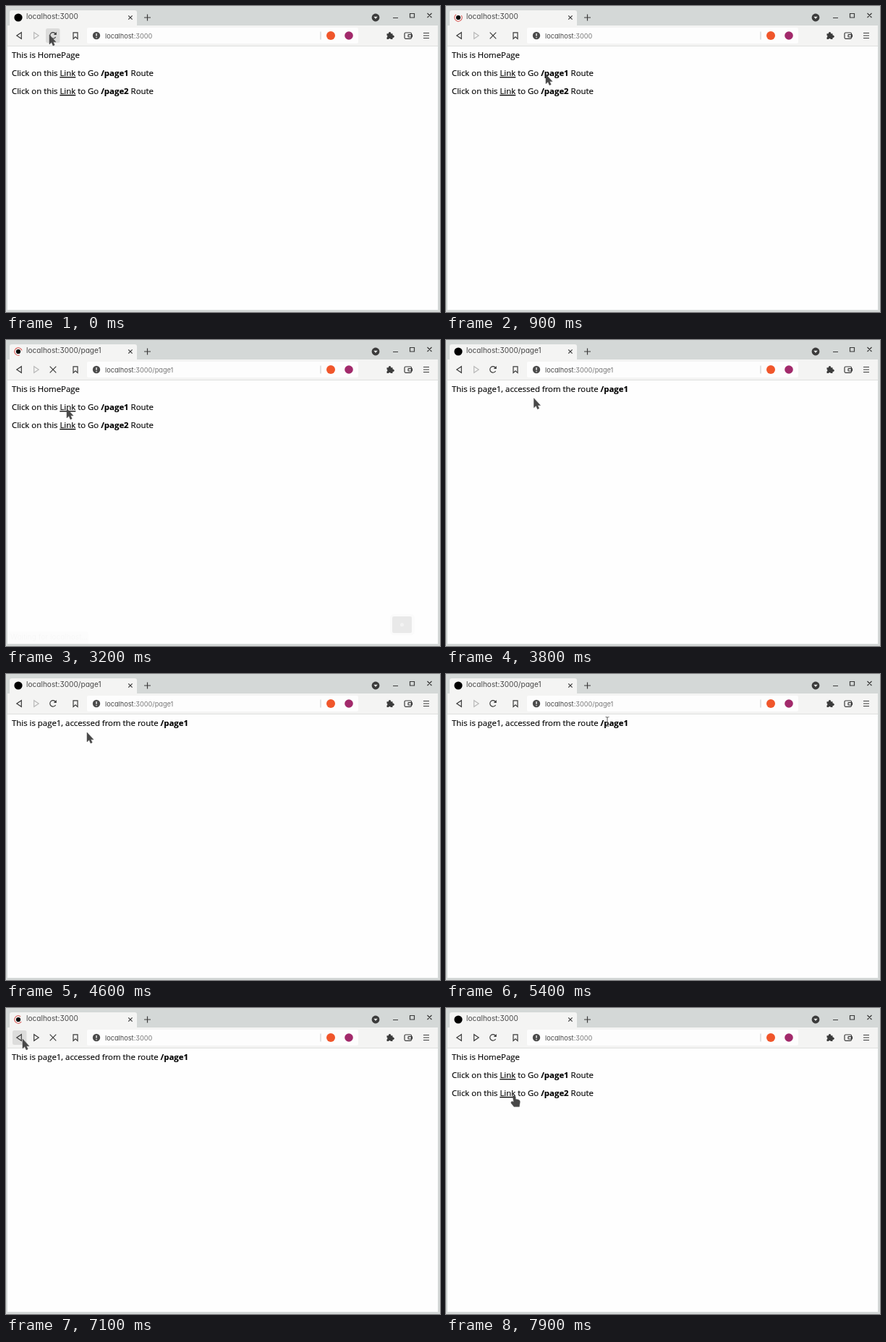
Write an HTML page that moves like this. It is 600 px wide and 424 px high and loops after 8000 ms.

```html
<!DOCTYPE html>
<html lang="en">
<head>
<meta charset="utf-8">
<title>Page routes</title>
<style>
  html, body { margin: 0; width: 100%; height: 100%; overflow: hidden; background: #d4d8d7; }
  svg { display: block; width: 100vw; height: 100vh; }
  .page { font: 11.4px "Open Sans", "Noto Sans", sans-serif; fill: #000; stroke: #000; stroke-width: .15; white-space: pre; }
  .page .b { font-weight: 700; }
  .page .u { text-decoration: underline; }
  .ui { font: 10.1px Inter, Lato, sans-serif; font-feature-settings: "cv11", "ss01"; fill: #484848; }
  .address { font-size: 9.2px; }
  .line { fill: none; stroke: #3b3b3b; stroke-width: 1.2; }
  .solid { fill: #3b3b3b; }
  .pointer { fill: #484848; stroke: #484848; stroke-width: .5; stroke-linejoin: round; }
</style>
</head>
<body>
<svg viewBox="0 0 600 424">
  <rect width="600" height="424" fill="#d4d8d7"/>
  <rect x="2" y="27" width="595" height="29" fill="#f4f4f3"/>
  <path d="M5 27V9q0-3 3-3H178q3 0 3 3V27Z" fill="#f4f4f3"/>
  <rect x="2" y="55" width="595" height="366" fill="#fefefe"/>
  <rect x="2" y="55" width="595" height="1" fill="#dedfde"/>

  <!-- tab -->
  <circle id="favicon" cx="17" cy="16" r="5.6"/>
  <circle id="spinner" cx="17" cy="16" r="5.2" fill="none" stroke="#d8504c" stroke-width="1" stroke-dasharray="24 9"/>
  <text id="title" class="ui" x="28" y="17.8"></text>
  <path class="line" d="M169.2 13.3l5.4 5.4m0-5.4l-5.4 5.4M191 16h9m-4.5-4.5v9" stroke-width="1.3"/>

  <!-- window buttons -->
  <circle class="solid" cx="511" cy="16" r="5.4"/>
  <path d="M508.3 14.7h5.4l-2.7 3.2z" fill="#e4e6e5"/>
  <path class="line" d="M535 16.5h7M558.5 10.5h6v5.5h-6zM582.5 10l6 6m0-6l-6 6"/>

  <!-- toolbar -->
  <rect id="hover" y="31" width="19.5" height="20" rx="2.5" fill="#dcdcdb"/>
  <path class="line" d="M14.8 41L21.3 36.7V45.3Z"/>
  <path id="forward" class="line" d="M45.2 41L38.7 36.7V45.3Z"/>
  <g id="reload">
    <path class="line" d="M68.6 43A4.2 4.2 0 1 1 68.3 38.3"/>
    <path class="solid" d="M69.8 36v4h-4z"/>
  </g>
  <path id="stop" class="line" d="M60.7 36.7l8.6 8.6m0-8.6l-8.6 8.6"/>
  <path class="line" d="M93 36.8h6v8.7l-3-2.6l-3 2.6z"/>
  <rect x="112" y="30" width="375" height="22" rx="2" fill="#fdfdfd"/>
  <circle cx="125" cy="41" r="5.2" fill="#4b4b4b"/>
  <path d="M125 38v3.8m0 1.1v1.3" stroke="#fff" stroke-width="1.3"/>
  <text class="ui address" x="137" y="44.5">localhost<tspan id="rest" fill="#777"></tspan></text>
  <path d="M435 35.5v11" stroke="#c9c9c9"/>
  <circle cx="449" cy="41" r="6" fill="#f0562b"/>
  <circle cx="474" cy="41" r="5.8" fill="#a22a6b"/>
  <g class="solid">
    <path d="M526.5 38.3h8v2.3a1.7 1.7 0 0 1 0 3.3v2.2h-2.7a1.5 1.5 0 0 0-2.9 0h-2.4v-2.6a1.5 1.5 0 0 0 0-2.8z"/>
    <circle cx="530.5" cy="37.8" r="1.7"/>
    <circle cx="535" cy="42.2" r="1.7"/>
  </g>
  <rect class="line" x="551" y="37" width="9.5" height="8.3" rx="1.5"/>
  <rect class="line" x="556" y="39.7" width="5.5" height="3.3" rx=".8"/>
  <path class="line" d="M577 37.5h8M577 41h8M577 44.5h8"/>

  <!-- page -->
  <g id="home" class="page">
    <text x="8" y="72.4">This is HomePage</text>
    <text x="8" y="97.2">Click on this <tspan class="u">Link</tspan> to Go <tspan class="b">/page1</tspan> Route</text>
    <text x="8" y="122">Click on this <tspan class="u">Link</tspan> to Go <tspan class="b">/page2</tspan> Route</text>
  </g>
  <text id="page1" class="page" x="8" y="72.4">This is page1, accessed from the route <tspan class="b">/page1</tspan></text>

  <g id="status">
    <path d="M2 404H111q3 0 3 3V421H2Z" fill="#d6d9d8"/>
    <text id="statusText" class="ui" x="6" y="415"></text>
  </g>
  <g id="building">
    <rect x="531" y="380" width="34" height="29" rx="5" fill="#fbfbfb"/>
    <rect x="534" y="383" width="27" height="23" rx="2" fill="#e9e9e9"/>
    <circle cx="547.5" cy="394.5" r="2.5" fill="#f3f3f3"/>
  </g>

  <!-- pointers, with their hot spot at 0,0 -->
  <path id="arrow" class="pointer" d="M0 0V13L3 10.3L5 15L7.2 14L5.2 9.8H9Z"/>
  <path id="hand" class="pointer" d="M-1.6 .5Q0-1.5 1.6 .5L2.5 4.5L6 5Q8.5 5.8 8.3 8L7.3 14.8H0L-4 9.8Q-4.4 7.3-2.3 7.5L-.4 8.2Z"/>
  <path id="beam" d="M-2.5-6.5Q0-6.5 0-5Q0-6.5 2.5-6.5M0-5V5M-2.5 6.5Q0 6.5 0 5Q0 6.5 2.5 6.5" fill="none" stroke="#777" stroke-width="1.2"/>
</svg>
<script>
const LOOP = 8000, STEP = 100;
const $ = id => document.getElementById(id);
const show = (id, on) => $(id).setAttribute("visibility", on ? "visible" : "hidden");
const within = (t, a, b) => t >= a && t < b;
const ramp = (t, a, b) => Math.min(1, Math.max(0, (t - a) / (b - a)));

// pointer stops: time, x, y
const path = [
  [0, 60, 40], [200, 60, 40], [400, 68, 46], [700, 188, 88], [1000, 113, 98],
  [1600, 84, 95], [3500, 84, 95], [3900, 134, 76], [4300, 51, 67],
  [4600, 112, 81], [4900, 168, 74], [5200, 213, 66], [5400, 223, 66],
  [5600, 245, 66], [5900, 130, 80], [6100, 80, 62], [6800, 23, 43],
  [7200, 23, 43], [7700, 90, 112], [7900, 94, 122], [8000, 94, 122]
];

function pointerAt(t) {
  const i = path.findIndex(p => p[0] > t);
  const [t0, x0, y0] = path[i - 1], [t1, x1, y1] = path[i];
  const k = (t - t0) / (t1 - t0);
  return [x0 + (x1 - x0) * k, y0 + (y1 - y0) * k];
}

function shapeAt(t) {
  if (within(t, 1800, 2700) || t >= 7800) return "hand";
  return within(t, 5100, 5700) ? "beam" : "arrow";
}

function draw(t) {
  const loading = within(t, 200, 1100) || within(t, 2700, 3400) || within(t, 7000, 7500);
  const rest = ":3000" + (within(t, 2700, 7000) ? "/page1" : "");
  $("title").textContent = "localhost" + rest;
  $("rest").textContent = rest;
  $("favicon").setAttribute("r", loading ? 3.1 : 5.6);
  show("spinner", loading);
  $("spinner").setAttribute("transform", `rotate(${t * 0.36} 17 16)`);
  show("stop", loading);
  show("reload", !loading);
  $("forward").style.stroke = t >= 7000 ? "#3b3b3b" : "#b9b9b9";

  const onBack = within(t, 7100, 7300);
  show("hover", t < 500 || onBack);
  $("hover").setAttribute("x", onBack ? 9 : 55);

  const onPage1 = within(t, 3400, 7300);
  show("home", !onPage1);
  show("page1", onPage1);

  const overLink = within(t, 1800, 2700);
  const waiting = within(t, 300, 900) || within(t, 2700, 3400);
  show("status", overLink || waiting);
  $("statusText").textContent = overLink ? "localhost:3000/page1" : "Waiting for localhost...";
  $("status").setAttribute("opacity", t < 2700 ? 1 : 1 - 0.97 * ramp(t, 2900, 3200));
  show("building", within(t, 2900, 3400));
  $("building").setAttribute("opacity", ramp(t, 2800, 3200));

  const [x, y] = pointerAt(t), shape = shapeAt(t);
  for (const id of ["arrow", "hand", "beam"]) {
    show(id, id === shape);
    $(id).setAttribute("transform", `translate(${x} ${y})`);
  }
}

function tick() {
  draw(Math.floor(performance.now() % LOOP / STEP) * STEP);
  requestAnimationFrame(tick);
}
tick();
</script>
</body>
</html>
```
